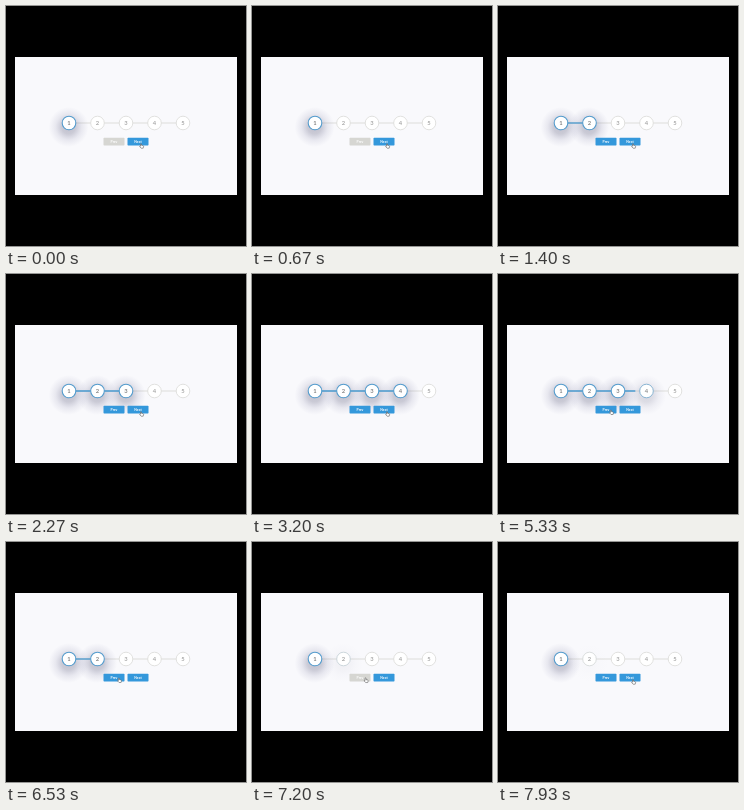
Write an HTML page that moves like this. It is 240 by 240 pixels and loops after 8000 ms.

```html
<!DOCTYPE html>
<html lang="en">
<head>
<meta charset="utf-8">
<title>Progress steps</title>
<style>
  html, body { margin: 0; width: 100%; height: 100%; overflow: hidden; background: #000; }
  svg { display: block; width: 100vw; height: 100vh; }
  text { font-family: Lato, sans-serif; text-anchor: middle; }
</style>
</head>
<body>
<svg viewBox="0 0 240 240">
  <defs>
    <radialGradient id="glow">
      <stop offset="0" stop-color="#70708c" stop-opacity=".42"/>
      <stop offset=".35" stop-color="#70708c" stop-opacity=".34"/>
      <stop offset=".65" stop-color="#7c7ca0" stop-opacity=".14"/>
      <stop offset="1" stop-color="#8888b0" stop-opacity="0"/>
    </radialGradient>
  </defs>
  <rect x="9" y="51" width="222" height="138" fill="#f9f9fc"/>
  <path d="M63 117H177" stroke="#dededc" stroke-width="1.1"/>
  <g id="glows"></g>
  <path id="progress" stroke="#4a9bd0" stroke-width="1.3"/>
  <g id="steps"></g>
  <g id="buttons"></g>
  <path id="cursor" d="M0 .2Q.5-.5 1 .2V1.6L2.7 2Q3.2 2.2 3.1 2.8L2.7 4.5H.6L-.9 2.8Q-.7 2.1 0 2.5Z"
        fill="#fff" stroke="#444" stroke-width=".5"/>
</svg>
<script>
const LOOP = 8000, FADE = 400, FIRST_X = 63, GAP = 28.5;
// Each click: time and the step it selects
const clicks = [
  [900, 2], [1750, 3], [2550, 4], [3250, 5],
  [4500, 4], [5160, 3], [5950, 2], [6900, 1], [7880, 2]
];
const $ = id => document.getElementById(id);
const clamp = v => Math.max(0, Math.min(1, v));
const smooth = v => { v = clamp(v); return v * v * (3 - 2 * v); };
const mix = (a, b, k) => a + (b - a) * k;
const color = (a, b, k) => `rgb(${a.map((v, i) => Math.round(mix(v, b[i], k)))})`;

function add(parent, tag, attrs, text = "") {
  const node = document.createElementNS("http://www.w3.org/2000/svg", tag);
  set(node, attrs);
  node.textContent = text;
  parent.append(node);
  return node;
}
function set(node, attrs) {
  for (const key in attrs) node.setAttribute(key, attrs[key]);
}

const steps = [1, 2, 3, 4, 5].map(n => {
  const x = FIRST_X + GAP * (n - 1);
  return {
    n,
    glow: add($("glows"), "circle", { cx: x - .4, cy: 121, r: 20, fill: "url(#glow)" }),
    ring: add($("steps"), "circle", { cx: x, cy: 117, r: 6.8, fill: "#fff" }),
    label: add($("steps"), "text", { x, y: 119, "font-size": 5.8, "font-weight": 700 }, n)
  };
});

function addButton(x, label) {
  const box = add($("buttons"), "rect", { x, y: 131.7, width: 21, height: 7.8, rx: .7 });
  add($("buttons"), "text", {
    x: x + 10.5, y: 136.7, "font-size": 3.4, "font-weight": 700, fill: "#fff"
  }, label);
  return box;
}
const prev = addButton(97.5, "Prev"), next = addButton(121.5, "Next");

function draw(t) {
  let from = 1, current = 1, since = -Infinity;
  for (const [time, step] of clicks) {
    if (t >= time) [from, current, since] = [current, step, time];
  }
  const k = smooth((t - since) / FADE);
  set($("progress"), { d: `M63 117H${FIRST_X + GAP * (mix(from, current, k) - 1)}` });

  for (const { n, glow, ring, label } of steps) {
    const active = mix(+(n <= from), +(n <= current), k);
    set(glow, { opacity: active });
    set(ring, {
      stroke: color([222, 222, 220], [82, 155, 205], active),
      "stroke-width": mix(.9, 1.05, active)
    });
    set(label, { fill: color([168, 168, 168], [132, 132, 132], active) });
  }
  set(prev, { fill: current === 1 ? "#d6d6d2" : "#3498db" });
  set(next, { fill: current === 5 ? "#d8d8d8" : "#3498db" });

  const away = smooth((t - 3500) / 500) - smooth((t - 7150) / 500);
  set($("cursor"), { transform: `translate(${mix(134.5, 112.4, away)} ${mix(137.7, 136, away)})` });
}

function frame() {
  draw(performance.now() % LOOP);
  requestAnimationFrame(frame);
}
frame();
</script>
</body>
</html>
```
